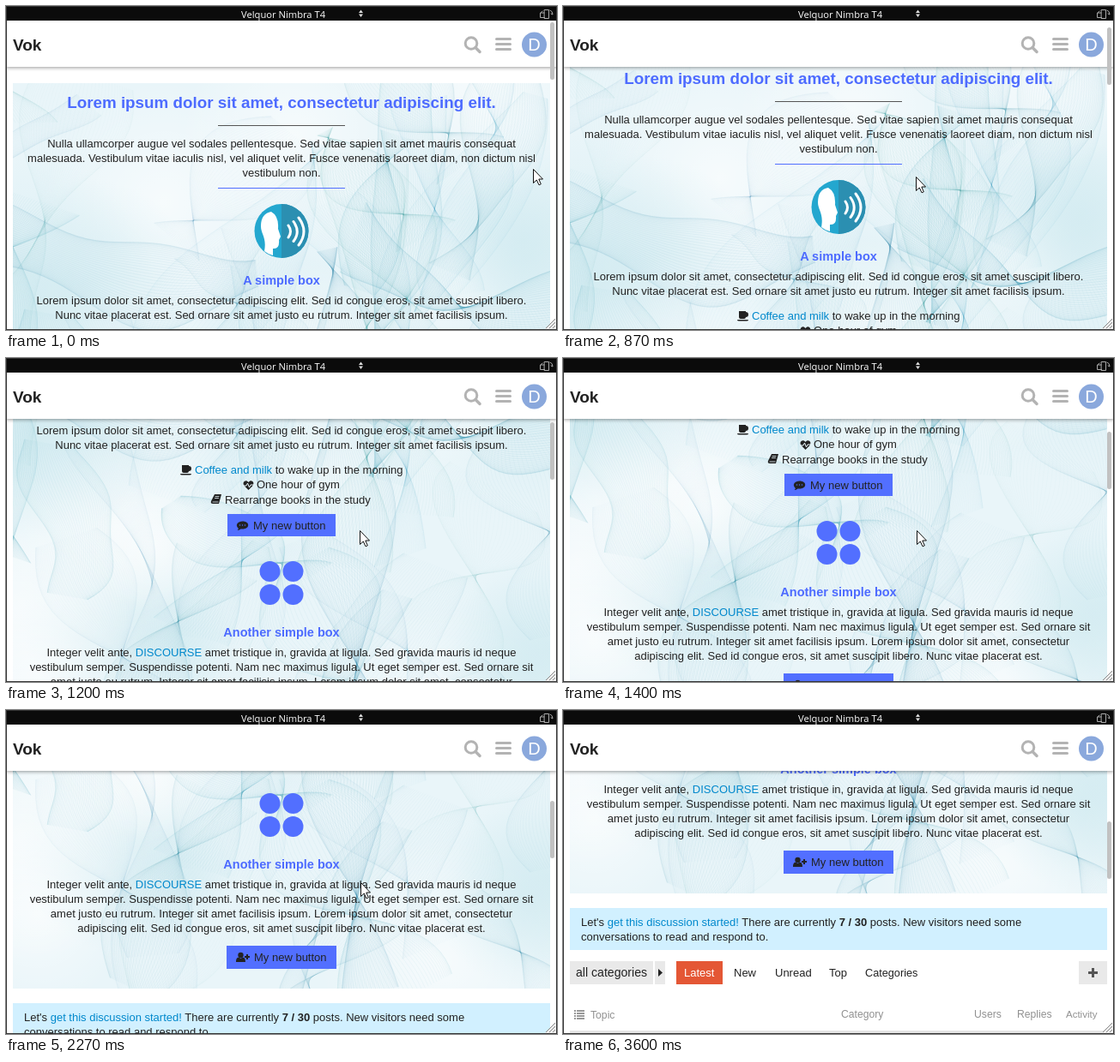
These frames come from a looping animation (642x378 px, 4.14 s). An HTML page with a canvas:

```html
<!DOCTYPE html>
<html lang="en">
<head>
<meta charset="utf-8">
<title>Forum page scroll</title>
<style>
html, body { margin: 0; width: 100%; height: 100%; overflow: hidden; background: #fff; }
canvas, svg { position: absolute; left: 0; top: 0; display: block; overflow: hidden; }
text { font: 13px "Liberation Sans", Arial, sans-serif; fill: #222; }
.mid { text-anchor: middle; }
.h1 { font-size: 18.82px; font-weight: bold; fill: #4d6bff; }
.h2 { font-size: 14.5px; font-weight: bold; fill: #4d6bff; }
.link { fill: #08c; }
.bold { font-weight: bold; }
.col { font-size: 12.2px; fill: #919191; }
.blue { fill: #526fff; }
.grey { fill: #e9e9e9; }
.icon { fill: #222; }
.line { fill: none; stroke-linecap: round; }
</style>
</head>
<body>
<canvas id="back" width="642" height="378"></canvas>
<svg width="642" height="378">
<g id="page">
  <text class="mid h1" x="321" y="119">Lorem ipsum dolor sit amet, consectetur adipiscing elit.</text>
  <rect x="247" y="139" width="148" height="1" fill="#555"/>
  <text class="mid" x="321" y="165">Nulla ullamcorper augue vel sodales pellentesque. Sed vitae sapien sit amet mauris consequat</text>
  <text class="mid" x="321" y="182">malesuada. Vestibulum vitae iaculis nisl, vel aliquet velit. Fusce venenatis laoreet diam, non dictum nisl</text>
  <text class="mid" x="321" y="199">vestibulum non.</text>
  <rect class="blue" x="247" y="212" width="148" height="1"/>

  <circle cx="321" cy="262.5" r="31.5" fill="#24a7cf"/>
  <path d="M321 231a31.5 31.5 0 0 1 0 63z" fill="#2b8fb1"/>
  <path d="M309 240Q297 242 297 257C297 266 304 270 301 286Q306 290 311 291V283Q319 284 318 273L320 269L317 260Q318 245 309 240Z" fill="#fff"/>
  <path class="line" d="M329 256q5 7 0 14M335 251.500q8.500 12 0 23M341 247q12 16 0 32" stroke="#fff" stroke-width="3"/>

  <text class="mid h2" x="321" y="325">A simple box</text>
  <text class="mid" x="321" y="348">Lorem ipsum dolor sit amet, consectetur adipiscing elit. Sed id congue eros, sit amet suscipit libero.</text>
  <text class="mid" x="321" y="365">Nunc vitae placerat est. Sed ornare sit amet justo eu rutrum. Integer sit amet facilisis ipsum.</text>

  <path class="icon" d="M205 384h8v1a3 3 0 0 1 0 6a2 2 0 0 1-2 2h-4a2 2 0 0 1-2-2zM203 394h13q0 1.500-2 1.500h-9q-2 0-2-1.500z"/>
  <text x="220" y="394"><tspan class="link">Coffee and milk</tspan> to wake up in the morning</text>
  <path class="icon" d="M282.500 413l-5-5c-3-4 2-8 5-4c3-4 8 0 5 4z"/>
  <path class="line" d="M276 408h4l1.500-3 2 5 1.500-3h4" stroke="#eaf6fa"/>
  <text x="292" y="411">One hour of gym</text>
  <path class="icon" d="M243 418h8l-3 11h-7q-3 0-2-3z"/>
  <path class="line" d="M244 420.500h4M243.500 422.500h4M241 427h6" stroke="#eaf6fa" stroke-width=".8"/>
  <text x="255" y="429">Rearrange books in the study</text>

  <rect class="blue" x="258" y="441" width="126" height="26"/>
  <path class="icon" d="M275.500 449.500c9 0 9 9 0 9h-2q-2 1.500-4 1.500q2-1.500 1-2.500c-4-4 0-8 5-8z"/>
  <path class="line" d="M272.500 454h0M275.500 454h0M278.500 454h0" stroke="#526fff" stroke-width="1.500"/>
  <text x="288" y="459">My new button</text>

  <g class="blue">
    <circle cx="307.500" cy="508" r="12"/><circle cx="334.500" cy="508" r="12"/>
    <circle cx="307.500" cy="535" r="12"/><circle cx="334.500" cy="535" r="12"/>
  </g>

  <text class="mid h2" x="321" y="584">Another simple box</text>
  <text class="mid" x="321" y="607">Integer velit ante, <tspan class="link">DISCOURSE</tspan> amet tristique in, gravida at ligula. Sed gravida mauris id neque</text>
  <text class="mid" x="321" y="624">vestibulum semper. Suspendisse potenti. Nam nec maximus ligula. Ut eget semper est. Sed ornare sit</text>
  <text class="mid" x="321" y="641">amet justo eu rutrum. Integer sit amet facilisis ipsum. Lorem ipsum dolor sit amet, consectetur</text>
  <text class="mid" x="321" y="658">adipiscing elit. Sed id congue eros, sit amet suscipit libero. Nunc vitae placerat est.</text>

  <rect class="blue" x="257" y="674" width="128" height="27"/>
  <circle class="icon" cx="273.500" cy="685" r="3.200"/>
  <path class="icon" d="M268 693c0-6 3-6 5.500-4c2.500-2 5.500-2 5.500 4zM278 686h2v-2h2v2h2v2h-2v2h-2v-2h-2z"/>
  <text x="289" y="692">My new button</text>

  <rect x="8" y="741" width="626" height="49" fill="#d1f0ff"/>
  <text x="21" y="762">Let's <tspan class="link">get this discussion started!</tspan> There are currently <tspan class="bold">7 / 30</tspan> posts. New visitors need some</text>
  <text x="21" y="779">conversations to read and respond to.</text>

  <path class="grey" d="M8 803h97v27h-97zM107 803h12v27h-12zM601 803h33v27h-33z"/>
  <path class="icon" d="M111 812l5 4.500-5 4.500z"/>
  <path d="M612 816.500h11M617.500 811v11" stroke="#555" stroke-width="3"/>
  <rect x="132" y="803" width="54" height="27" fill="#e45735"/>
  <text x="15" y="821" style="font-size:14.1px">all categories</text>
  <text x="141" y="821" style="fill:#fff">Latest</text>
  <text x="199" y="821">New</text>
  <text x="247" y="821">Unread</text>
  <text x="310" y="821">Top</text>
  <text x="352" y="821" style="font-size:12.7px">Categories</text>

  <path d="M13 861h2m1 0h9M13 864h2m1 0h9M13 867h2m1 0h9M13 870h2m1 0h9" stroke="#999" stroke-width="1.800"/>
  <text class="col" x="32" y="870">Topic</text>
  <text class="col" x="324" y="869">Category</text>
  <text class="col" x="479" y="869">Users</text>
  <text class="col" x="529" y="869">Replies</text>
  <text class="col" x="586" y="869" style="font-size:11.5px">Activity</text>
  <rect x="8" y="884" width="626" height="3" fill="#e4e4e4"/>
</g>

<rect y="17" width="642" height="54" fill="#fff" style="filter:drop-shadow(0 1px 2px #0006)"/>
<rect width="642" height="17" fill="#0b0b0b"/>
<text x="274" y="13.500" style="font:500 11.200px 'Open Sans',sans-serif;fill:#fff">Velquor Nimbra T4</text>
<path d="M411 8l2.500-3.500L416 8zM411 9.500h5L413.500 13z" fill="#ddd"/>
<path class="line" d="M627.500 4.500h5v10h-5zM627 8h-4.500v5.500h5M625 6l-2 2M634 5q3 1 3 5l-2-1" stroke="#aaa"/>
<text x="8" y="52" style="font-size:19px;font-weight:bold">Vok</text>
<circle cx="542" cy="43.500" r="6.800" fill="none" stroke="#b3b3b3" stroke-width="3"/>
<path class="line" d="M547.500 49l4.500 4.500" stroke="#b3b3b3" stroke-width="3.500"/>
<path class="line" d="M571.500 38.500h16M571.500 44.500h16M571.500 50.500h16" stroke="#b3b3b3" stroke-width="3"/>
<circle cx="615.500" cy="45" r="14.500" fill="#8aa8dc"/>
<text class="mid" x="615.500" y="52" style="font-size:20px;fill:#fff">D</text>
<rect id="thumb" x="634" width="5" height="67" rx="2.500" fill="#c1c1c1"/>
<path d="M628 377l12-12v12z" fill="#eee"/>
<path d="M629 376l11-11M633 376l7-7M637 376l3-3" stroke="#888"/>
<rect x=".5" y=".5" width="641" height="377" fill="none" stroke="#333"/>
<path id="cursor" d="M.5 .5V16.500L4.300 13L7 18.800L9.300 17.800L6.800 12H11.500Z" fill="#fff" stroke="#111"/>
</svg>

<script>
const byId = id => document.getElementById(id);
const page = byId('page'), thumb = byId('thumb'), cursor = byId('cursor');
const back = byId('back').getContext('2d');

// The smoky backdrop of the page, painted once.
const WIDTH = 626, HEIGHT = 634;
const smoke = document.createElement('canvas');
smoke.width = WIDTH;
smoke.height = HEIGHT;
const ctx = smoke.getContext('2d');

let seed = 11;
const random = () => (seed = seed * 16807 % 2147483647) / 2147483647;
const spread = size => (random() - .5) * size;

function glow(x, y, radius, rgb) {
  const g = ctx.createRadialGradient(x, y, 0, x, y, radius);
  g.addColorStop(0, `rgba(${rgb},.6)`);
  g.addColorStop(1, `rgba(${rgb},0)`);
  ctx.fillStyle = g;
  ctx.fillRect(0, 0, WIDTH, HEIGHT);
}

// A twisting bundle of strands that crowd towards its folded edges.
function veil(x, y, dx, dy, width, alpha) {
  const strands = 44, steps = 28, length = Math.hypot(dx, dy);
  const phase = random() * 6, twist = 1.5 + random() * 3, sway = spread(110), bend = spread(50);
  ctx.strokeStyle = `rgba(50,140,162,${alpha})`;
  for (let i = 0; i <= strands; i++) {
    const f = Math.cos(Math.PI * i / strands) / 2;
    ctx.beginPath();
    for (let j = 0; j <= steps; j++) {
      const s = j / steps;
      const off = sway * Math.sin(3 * s + phase) + bend * f * Math.sin(9 * s + phase + f)
        + width * f * Math.cos(twist * s + phase);
      ctx.lineTo(x + dx * s - dy / length * off, y + dy * s + dx / length * off);
    }
    ctx.stroke();
  }
}

function paintSmoke() {
  ctx.fillStyle = '#e9f5f9';
  ctx.fillRect(0, 0, WIDTH, HEIGHT);
  for (let i = 0; i < 20; i++)
    glow(random() * WIDTH, random() * HEIGHT, 70 + random() * 100, i % 2 ? '255,255,255' : '208,234,240');
  for (let i = 0; i < 34; i++)
    veil(random() * WIDTH, random() * HEIGHT - 90, spread(260), 130 + random() * 200, 40 + random() * 110, .02 + random() * .03);
  veil(340, 200, 100, 434, 100, .06);
  veil(-20, 210, 300, -30, 90, .06);
  veil(400, 170, 240, 90, 90, .07);
}

const TICK = 200 / 3, LOOP = 4140;

// Progress from 0 to 1; a power above 1 slows towards the end.
const glide = (t, start, end, power = 1) =>
  1 - (1 - Math.min(1, Math.max(0, (t - start) / (end - start)))) ** power;

function draw() {
  const t = Math.floor((performance.now() % LOOP + 4) / TICK) * TICK;

  const scroll = Math.round(306 * glide(t, 838, 1400, 1.82) + 204 * glide(t, 1990, 2600));
  page.setAttribute('transform', `translate(0 ${-scroll})`);
  thumb.setAttribute('y', Math.round(19 + scroll * .2176));
  back.clearRect(0, 0, 642, 378);
  back.drawImage(smoke, 8, 90 - scroll);

  const x = 614 + 2 * glide(t, 200, 333) - 205 * glide(t, 400, 866) + glide(t, 870, 1200)
    + glide(t, 1467, 1533) - 295 * glide(t, 2867, 3540, .85);
  const y = 190 + 14 * glide(t, 0, 66) - 16 * glide(t, 200, 333) + 11 * glide(t, 400, 866)
    + 2 * glide(t, 870, 1200) + 165 * glide(t, 2867, 3400) + 40 * glide(t, 3540, 3600);
  cursor.setAttribute('transform', `translate(${Math.round(x)} ${Math.round(y)})`);
  requestAnimationFrame(draw);
}

paintSmoke();
draw();
</script>
</body>
</html>
```
